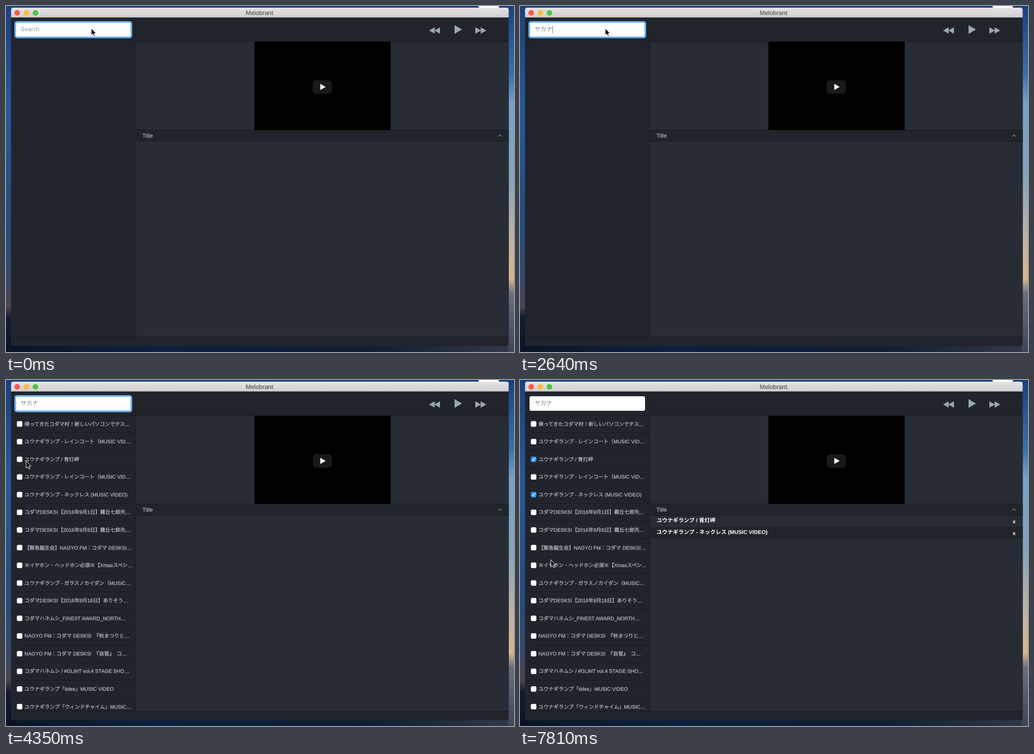
Animation, 906 px wide and 618 px high, one loop 8000 ms. Source, as an HTML page:

```html
<!DOCTYPE html>
<html lang="ja">
<head>
<meta charset="utf-8">
<title>Melobrant</title>
<style>
  html, body { margin: 0; width: 100%; height: 100%; overflow: hidden; background: #12294f; }
  svg { display: block; width: 906px; height: 618px; }
  text { font-family: "Liberation Sans", "Noto Sans CJK JP", "Noto Sans CJK", sans-serif;
         text-rendering: geometricPrecision; white-space: pre; }
  .bar { fill: #21252b; }
  .line { fill: #181a1f; }
  .icon { fill: #9aa8b5; }
  .item { font-size: 9px; font-weight: 500; fill: #b0b8c5; stroke: #b0b8c5; stroke-width: .25px; }
  .head { font-size: 10px; fill: #b6bdc9; stroke: #b6bdc9; stroke-width: .15px; }
  .track { font-size: 9.7px; font-weight: 700; fill: #fff; }
  .entry { font-size: 10.5px; fill: #808080; }
  .word { font: 700 12.8px "Noto Serif CJK JP", "Noto Sans CJK JP", "Noto Sans CJK", serif; fill: #000; }
  .hint { font-size: 8.15px; fill: #7d7d7d; }
</style>
</head>
<body>
<svg viewBox="0 0 906 618">
  <defs>
    <linearGradient id="left" x2="0" y2="1">
      <stop offset="0" stop-color="#1c407f"/><stop offset=".3" stop-color="#285996"/>
      <stop offset=".65" stop-color="#254a7c"/><stop offset=".8" stop-color="#38496a"/>
      <stop offset=".87" stop-color="#4d424d"/><stop offset=".9" stop-color="#131c2e"/>
      <stop offset="1" stop-color="#0a1426"/>
    </linearGradient>
    <linearGradient id="right" x2="0" y2="1">
      <stop offset="0" stop-color="#1c407f"/><stop offset=".2" stop-color="#3d70aa"/>
      <stop offset=".28" stop-color="#75a0c8"/><stop offset=".5" stop-color="#86a5bb"/>
      <stop offset=".68" stop-color="#c0b3a2"/><stop offset=".79" stop-color="#d8b58e"/>
      <stop offset=".83" stop-color="#68707f"/><stop offset="1" stop-color="#3c4658"/>
    </linearGradient>
    <linearGradient id="floor">
      <stop offset="0" stop-color="#0a1426"/><stop offset=".3" stop-color="#0e2040"/>
      <stop offset=".7" stop-color="#0f1c33"/><stop offset="1" stop-color="#303947"/>
    </linearGradient>
    <linearGradient id="chrome" x2="0" y2="1">
      <stop offset="0" stop-color="#e6e4e6"/><stop offset="1" stop-color="#cfcdcf"/>
    </linearGradient>
    <clipPath id="frame"><rect x="9" y="3" width="887.5" height="604.5" rx="4"/></clipPath>
    <clipPath id="side"><rect x="9" y="64" width="222" height="527"/></clipPath>
    <filter id="shadow" x="-20%" y="-20%" width="140%" height="150%">
      <feDropShadow dx="0" dy="3" stdDeviation="4" flood-opacity=".45"/>
    </filter>
  </defs>

  <rect width="906" height="618" fill="#1c407f"/>
  <rect y="600" width="906" height="18" fill="url(#floor)"/>
  <rect width="10" height="618" fill="url(#left)"/>
  <rect x="895" width="11" height="618" fill="url(#right)"/>
  <rect x="843" width="36" height="3" fill="#fff"/>

  <g clip-path="url(#frame)">
    <rect class="bar" x="9" y="3" width="888" height="605"/>
    <rect x="9" y="3" width="888" height="18" fill="url(#chrome)"/>
    <rect class="line" x="9" y="20.5" width="888" height="1"/>
    <rect x="232" y="64" width="665" height="527" fill="#282c34"/>
    <rect class="line" x="9" y="63" width="888" height="1"/>
    <rect class="line" x="231" y="21" width="1" height="570"/>
    <rect class="line" x="9" y="591" width="888" height="1"/>
    <rect class="bar" x="232" y="222" width="665" height="19"/>
    <rect class="line" x="232" y="221" width="665" height="1"/>
    <rect class="line" x="232" y="241" width="665" height="1"/>
  </g>
  <circle cx="20" cy="12.2" r="5" fill="#fc5650"/>
  <circle cx="36.4" cy="12.2" r="5" fill="#fdbb3f"/>
  <circle cx="52.5" cy="12.2" r="5" fill="#4fc43f"/>
  <text x="452" y="16.3" font-size="11" text-anchor="middle" fill="#3f3f3f">Melobrant</text>

  <path class="icon" d="M764.5 38v11.4l-10-5.7zM774 38v11.4l-10-5.7zM800 34.2v15.6l13.2-7.8zM837 38v11.4l10-5.7zM846.5 38v11.4l10-5.7z"/>
  <rect x="443" y="64" width="243" height="157.5" fill="#000"/>
  <rect x="547" y="132.5" width="34.3" height="24.3" rx="6" fill="#19191b"/>
  <path d="M560.5 139v11l9.6-5.5z" fill="#fff"/>
  <text class="head" x="243.3" y="234.7">Title</text>
  <path d="M878 233.2l3.2-3.2 3.2 3.2" fill="none" stroke="#b6bdc9"/>

  <g id="list" clip-path="url(#side)"></g>
  <g id="tracks"></g>

  <rect x="17" y="29" width="206" height="26" rx="3" fill="#fff"/>
  <rect id="ring" x="16.5" y="28.5" width="207" height="27.5" rx="3" fill="#fff" stroke="#6fb1f4" stroke-width="3"/>
  <text id="entry" class="entry" x="26" y="45.2"></text>
  <rect id="underline" x="26.5" y="47" height="1" fill="#555"/>
  <rect id="caret" y="35.5" width="1" height="13" fill="#777"/>

  <g id="popup">
    <path d="M17 51.5h145v85.5a4 4 0 0 1-4 4h-137a4 4 0 0 1-4-4z" fill="#fff" filter="url(#shadow)"/>
    <text class="word" x="26" y="67.3">サカナ</text>
    <text class="word" id="second" x="26" y="91.2"></text>
    <text class="hint" x="28" y="134">Tab キーで予測された単語を選択</text>
  </g>
  <path id="pointer" d="M0 0V12.3L2.8 9.7 4.8 14 6.7 13.2 4.9 9H8.7Z" stroke="#fff" stroke-width=".9"/>
</svg>
<script>
const LOOP = 8000, ROW = 31.56;
const titles = [
  '帰ってきたコダマ村！新しいパソコンでテス…',
  'ユウナギランプ - レインコート（MUSIC VID…',
  'ユウナギランプ / 青灯岬',
  'ユウナギランプ - レインコート（MUSIC VID…',
  'ユウナギランプ - ネックレス (MUSIC VIDEO)',
  'コダマDESKS!【2016年9月1日】霧丘七郎先…',
  'コダマDESKS!【2016年9月8日】霧丘七郎先…',
  '【緊急誕生会】NAGYO FM：コダマ DESKS!…',
  '※イヤホン・ヘッドホン必須※【Xmasスペシ…',
  'ユウナギランプ - ガラスノカイダン（MUSIC…',
  'コダマDESKS!【2016年8月18日】ありそう…',
  'コダマハネムシ_FINEST AWARD_NORTH…',
  'NAGYO FM：コダマ DESKS!　『秋まつりと…',
  'NAGYO FM：コダマ DESKS!　『自習』　コ…',
  'コダマハネムシ / #GLINT vol.4 STAGE SHO…',
  'ユウナギランプ「tides」MUSIC VIDEO',
  'ユウナギランプ「ウィンドチャイム」MUSIC…'
];

// Each timeline is a list of [start time, value...].
const typing = [[0, 'Search'], [390, 's'], [500, 'さ'], [620, 'さk'], [800, 'さか'],
                [910, 'さかn'], [1030, 'さかな'], [1210, 'サカナ']];
const carets = [[0, 0], [120, 1], [2100, 0], [2640, 1], [3230, 0], [3760, 1], [4290, 0]];
const checks = {
  2: [[0, 'off'], [4530, 'press'], [4710, 'on'], [5300, 'onPress'], [5450, 'off'], [6050, 'press'], [6140, 'on']],
  4: [[0, 'off'], [7230, 'press'], [7310, 'on']]
};
const fills = { off: '#fff', press: '#c6c6c6', on: '#3296fb', onPress: '#0f78ee' };
const path = [[0, 152, 40], [3444, 152, 40], [3670, 106, 78.5], [3900, 60, 126], [4070, 41, 152],
              [4290, 36, 145], [4440, 35, 144], [6606, 35, 144], [6670, 37, 150.5], [6990, 44, 207],
              [7583, 44, 207], [7810, 55, 321], [LOOP, 55, 321]];
const ticks = [[0, 60], [3500, 56.4], [6670, 64], [7640, 56.6]];

const $ = id => document.getElementById(id);
const latest = (line, t) => line.filter(step => step[0] <= t).pop();
const show = (el, on) => el.setAttribute('visibility', on ? 'visible' : 'hidden');

function add(parent, tag, attrs, text = '') {
  const el = document.createElementNS('http://www.w3.org/2000/svg', tag);
  for (const key in attrs) el.setAttribute(key, attrs[key]);
  el.textContent = text;
  return parent.appendChild(el);
}

const boxes = titles.map((title, i) => {
  const y = 78.3 + i * ROW, list = $('list');
  add(list, 'rect', { class: 'line', x: 9, y: Math.round(y + 15.5), width: 222, height: 1 });
  add(list, 'text', { class: 'item', x: 33, y: y + 3.3 }, title);
  const box = add(list, 'rect', { x: 19.4, y: y - 4.7, width: 9.8, height: 9.8, rx: 2.2, fill: '#fff' });
  const tick = add(list, 'path', { d: `M21.8 ${y + .3}l1.9 2 3.3-4.6`, fill: 'none', stroke: '#fff',
                                   'stroke-width': 1.3, visibility: 'hidden' });
  return { box, tick };
});

const tracks = [2, 4].map((index, i) => {
  const g = add($('tracks'), 'g', {}), y = 254.2 + i * 21;
  if (i) add(g, 'rect', { class: 'bar', x: 232, y: 262.5, width: 664.5, height: 21 });
  add(g, 'text', { class: 'track', x: 243.7, y }, titles[index]);
  add(g, 'text', { class: 'track', x: 878.5, y: y + 1.3 }, 'x');
  return { g, index };
});

function pointerAt(time) {
  const [start, step] = latest(ticks, time);
  const t = start + Math.floor((time - start) / step) * step;
  const i = Math.max(1, path.findIndex(p => p[0] > t));
  const [t0, x0, y0] = path[i - 1], [t1, x1, y1] = path[i];
  const k = (t - t0) / (t1 - t0);
  return [Math.round(x0 + (x1 - x0) * k), Math.round(y0 + (y1 - y0) * k)];
}

function draw(t) {
  const text = latest(typing, t)[1], typed = t >= 390;
  const width = typed ? [...text].reduce((w, c) => w + (c < '~' ? 5.25 : 10.5), 0) : 0;
  $('entry').textContent = text;
  $('entry').style.fill = typed ? '' : '#9a9a9a';
  $('underline').setAttribute('width', width);
  show($('underline'), typed && t < 1620);
  $('caret').setAttribute('x', 26 + width);
  show($('caret'), latest(carets, t)[1]);
  show($('popup'), t >= 500 && t < 1210);
  $('second').textContent = t < 800 ? '作成' : 'サカナの料理屋';

  show($('list'), t >= 2760);
  show($('ring'), t < 4530);
  for (const i in checks) {
    const state = latest(checks[i], t)[1], { box, tick } = boxes[i];
    box.setAttribute('fill', fills[state]);
    show(tick, t >= 2760 && state.startsWith('on'));
  }
  for (const { g, index } of tracks) show(g, latest(checks[index], t)[1].startsWith('on'));
  $('pointer').setAttribute('transform', `translate(${pointerAt(t)})`);
}

const origin = performance.now();
function loop() {
  draw((performance.now() - origin) % LOOP);
  requestAnimationFrame(loop);
}
loop();
</script>
</body>
</html>
```
